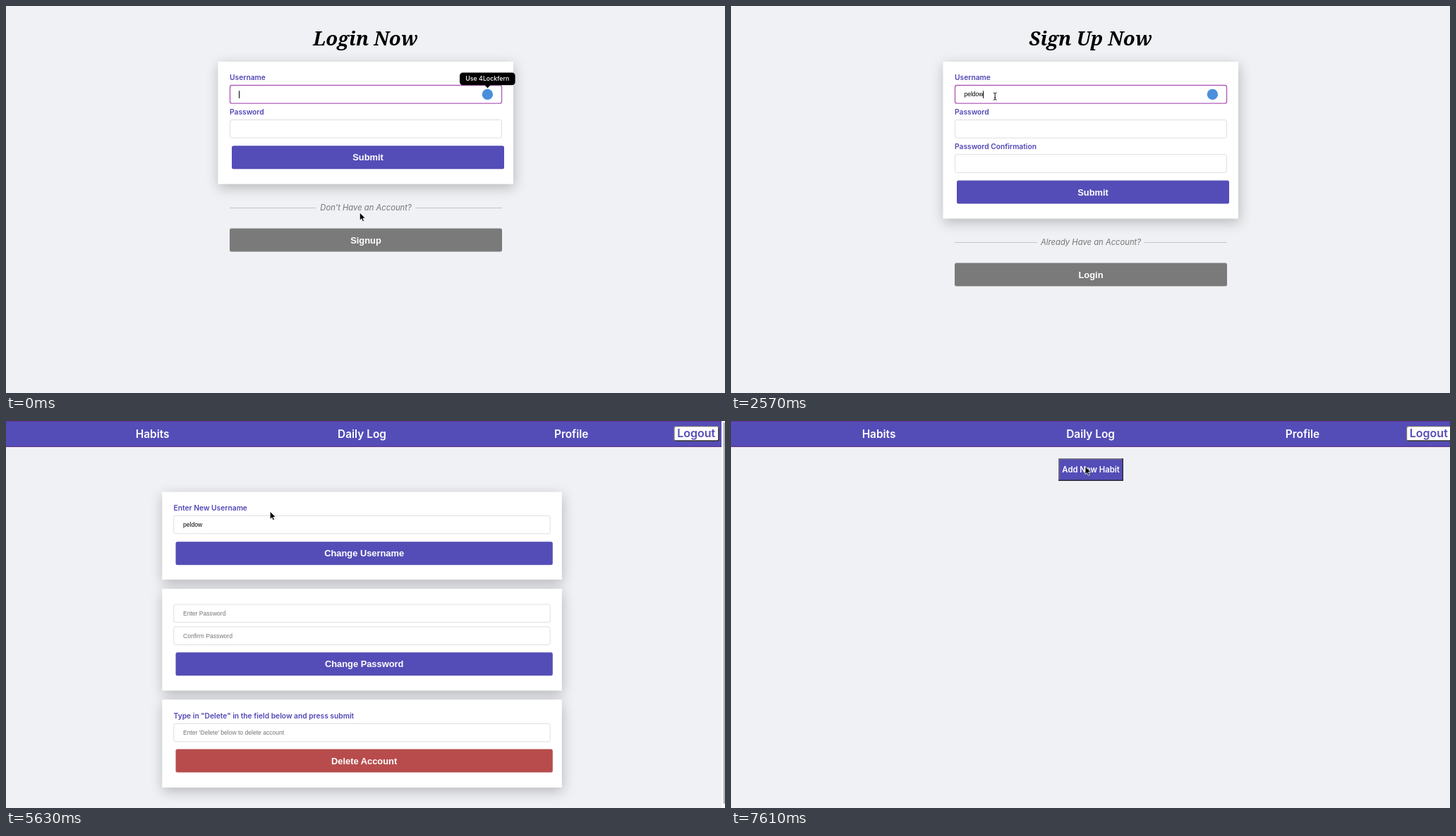
Recreate the animation shown at these times as an HTML page. Size 1019x549 px, loop 8000 ms.

```html
<!DOCTYPE html>
<html lang="en">
<head>
<meta charset="utf-8">
<title>Habit tracker sign up</title>
<style>
  html, body { margin: 0; width: 100%; height: 100%; overflow: hidden; background: #f0f1f4; }
  svg { display: block; width: 1019px; height: 549px; }
  text { white-space: pre; }
  .title { font: italic 700 27.4px "Noto Serif", Georgia, serif; text-anchor: middle; }
  .label { font: 600 10.25px Inter, sans-serif; fill: #4f46b5; }
  .input { font: 8.57px "Liberation Sans", Arial, sans-serif; fill: #000; }
  .hint { font: 8.57px "Liberation Sans", Arial, sans-serif; fill: #757575; }
  .btn { font: 700 12.86px "Liberation Sans", Arial, sans-serif; fill: #fff; text-anchor: middle; }
  .note { font: italic 400 11.25px Inter, sans-serif; fill: #757575; text-anchor: middle; }
  .nav { font: 600 15.4px Inter, sans-serif; fill: #fff; text-anchor: middle; }
  .logout { font: 600 16px Inter, sans-serif; fill: #544db7; }
  .add { font: 600 11.3px Inter, sans-serif; fill: #fff; text-anchor: middle; }
  .tip { font: 500 8.8px Inter, sans-serif; fill: #fff; text-anchor: middle; }
  .card { fill: #fff; filter: drop-shadow(1.5px 5px 9px rgba(0, 0, 0, .24)); }
</style>
</head>
<body>
<svg id="stage" viewBox="0 0 1019 549" xmlns="http://www.w3.org/2000/svg"></svg>
<script>
const LOOP = 8000, STEP = 89.5;
const VIOLET = '#544db7', GREY = '#7a7a7a', RED = '#b84c4c', FOCUS = '#b05fb8';
const NAME = 'peldow';

// Key times in ms
const SIGNUP = 450, PROFILE = 5540, HABITS = 6860;
const FOCUS_AT = [1420, 2930, 3830, 4820];
const TIP_ON = 1510, TIP_OFF = 2050;
const KEYS = [
  [1960, 2140, 2220, 2390, 2480, 2570],
  [3290, 3380, 3560, 3650, 3740],
  [4190, 4460, 4550, 4640, 4730]
];

// Pointer path: time, x, y
const PATH = [
  [0, 501.3, 293], [300, 507, 326], [480, 505, 325], [800, 330, 142],
  [1000, 301, 104], [1500, 374.2, 128.2], [5990, 374.2, 128.2],
  [6620, 225, 26], [6800, 225, 26], [7590, 502, 64.5]
];

const SHAPES = {
  arrow: '<path d="M0 0V11.2L2.6 8.8L4.3 12.7L6.2 11.9L4.6 8.1H8.1Z" fill="#000" stroke="#fff" stroke-width=".8"/>',
  beam: '<path d="M-2.3-5Q0-5 0-3.8Q0-5 2.3-5M0-4V4M-2.3 5Q0 5 0 3.8Q0 5 2.3 5M-1.2 1.8H1.2" fill="none" stroke="#111"/>',
  hand: '<path d="M-1 .8Q0-.8 1 .8V4.4Q2.4 3.6 3 4.8Q4.4 4.2 4.8 5.4Q6.4 5 6.4 6.8V8.6L5.4 12H-.6L-3.4 8Q-4 6.4-2.6 6.4L-1 7.8Z" fill="#fff" stroke="#000" stroke-width=".9"/>' +
    '<path d="M1 8V10.5M2.6 8V10.5M4.2 8V10.5" stroke="#000" stroke-width=".6"/>'
};

const pen = document.createElement('canvas').getContext('2d');
const textWidth = s => {
  pen.font = '8.57px "Liberation Sans", Arial, sans-serif';
  return pen.measureText(s).width;
};

const rect = (x, y, w, h, fill, r = 0, more = '') =>
  `<rect x="${x}" y="${y}" width="${w}" height="${h}" rx="${r}" fill="${fill}" ${more}/>`;
const text = (cls, x, y, s) => `<text class="${cls}" x="${x}" y="${y}">${s}</text>`;
const card = (x, y, w, h) => rect(x, y, w, h, '#fff', 0, 'class="card"');
const button = (x, y, w, s, fill = VIOLET) =>
  rect(x, y, w, 33, fill, 2.5) + text('btn', x + w / 2, y + 21.1, s);
const field = (x, y, w, on = false) =>
  rect(x + .5, y + .5, w - 1, 25.6, '#fff', 2.5, `stroke="${on ? FOCUS : '#dedede'}" stroke-width="${on ? 1.4 : 1}"`);
const caret = (x, y) => rect(x, y + 8.3, 1, 10.6, '#000');
const badge = y => `<circle cx="682.4" cy="${y + 13.4}" r="7.7" fill="#4a8fdc"/>`;
const count = (times, t) => times.filter(at => t >= at).length;

function dots(n, y) {
  let out = '';
  for (let i = 0; i < n; i++) out += `<circle cx="${331.8 + i * 3.05}" cy="${y + 13.2}" r="1.2"/>`;
  return out;
}

const tooltip = () =>
  rect(643, 94.4, 78.6, 17.8, '#000', 4.5) +
  '<path d="M678.5 112H686.5L682.5 116.6Z"/>' +
  text('tip', 682.3, 106.4, 'Use 4Lockfern');

function footer(y, gap, note, label) {
  const line = (a, b) => rect(a, y, b - a, 1, '#c3c4c6');
  return line(317, 509.8 - gap) + line(509.8 + gap, 703) +
    text('note', 510, y + 3.7, note) + button(317, y + 29.6, 386, label, GREY);
}

function loginPage() {
  return text('title', 509.5, 56, 'Login Now') + card(300.5, 79, 418.5, 173.6) +
    text('label', 317, 104.8, 'Username') + text('label', 317, 154, 'Password') +
    field(317, 112, 386, true) + field(317, 161, 386) +
    caret(330, 112) + badge(112) + button(320, 198.2, 386, 'Submit') +
    footer(286, 70.3, "Don't Have an Account?", 'Signup') + tooltip();
}

function signupPage(t) {
  const focus = count(FOCUS_AT, t) - 1;
  const typed = KEYS.map(k => count(k, t));
  const user = NAME.slice(0, typed[0]);
  let out = text('title', 509.5, 56, 'Sign Up Now') + card(300.5, 79, 418.5, 222.6);
  ['Username', 'Password', 'Password Confirmation'].forEach((s, i) => {
    const y = 112 + i * 49.1;
    out += text('label', 317, y - 7.2, s) + field(317, y, 386, focus === i);
    out += i ? dots(typed[i], y) : text('input', 330.4, y + 16.3, user);
    if (focus === i) {
      const w = i ? typed[i] * 3.05 : textWidth(user);
      out += caret(330 + w, y) + badge(y);
    }
  });
  out += button(320, 247.4, 386, 'Submit');
  if (focus === 3) out += rect(319.7, 247.1, 386.7, 33.7, 'none', 2.8, 'stroke="#a64fae"');
  out += footer(335, 76.2, 'Already Have an Account?', 'Login');
  return t >= TIP_ON && t < TIP_OFF ? out + tooltip() : out;
}

function navBar(w, xs) {
  return rect(0, 0, w, 36.6, VIOLET) + rect(0, 0, w, 1, '#6d2ca0') + rect(0, 35.8, w, 1, '#5b2480') +
    ['Habits', 'Daily Log', 'Profile'].map((s, i) => text('nav', xs[i], 24.4, s)).join('');
}

const logout = x =>
  rect(x, 7.6, 63, 20.6, '#fff', 2.5, 'stroke="#77777c" stroke-width="1.2"') +
  `<path d="M${x + 1} 28.2H${x + 61}Q${x + 63} 28.2 ${x + 63} 26V9.5" fill="none" stroke="#222" stroke-width="1.3"/>` +
  text('logout', x + 4.2, 23.4, 'Logout');

function profilePage(t) {
  const scroll = 3.6 * ease((t - 6170) / 270);
  const entry = (y, cls, s) => field(237.3, y, 534.4) + text(cls, 251, y + 16.3, s);
  const act = (y, s, fill) => button(240.5, y, 534.3, s, fill);
  return `<g transform="translate(0 ${-scroll})">` +
    navBar(1014, [207.6, 504.5, 801.2]) +
    card(221.3, 100.6, 566.5, 124.4) +
    text('label', 237.5, 127.1, 'Enter New Username') +
    entry(133.8, 'input', NAME) + act(171.2, 'Change Username') +
    card(221.3, 238, 566.5, 144.4) +
    entry(259.6, 'hint', 'Enter Password') + entry(291.4, 'hint', 'Confirm Password') +
    act(328.2, 'Change Password') +
    card(221.3, 395.2, 566.5, 124.8) +
    text('label', 237.5, 421.6, 'Type in "Delete" in the field below and press submit') +
    entry(428.8, 'hint', "Enter 'Delete' below to delete account") +
    act(465.6, 'Delete Account', RED) + '</g>' +
    rect(1014, 0, 5, 549, '#fafafa') + rect(1016.6, 2 + scroll, 2.4, 541, '#b4b4b8', 1.2) +
    logout(947);
}

function habitsPage() {
  return navBar(1019, [209.5, 509.6, 810]) + logout(957.6) +
    rect(464, 53, 92, 32, VIOLET) +
    '<path d="M464.7 85V53.7H556" fill="none" stroke="#77777c" stroke-width="1.4"/>' +
    '<path d="M464 84.3H555.3V53" fill="none" stroke="#2c2b35" stroke-width="1.4"/>' +
    text('add', 510, 72.5, 'Add New Habit');
}

function ease(p) {
  p = Math.min(1, Math.max(0, p));
  return p * p * (3 - 2 * p);
}

function pointerAt(t) {
  const q = Math.floor((t + 14) / STEP) * STEP;
  let i = 0;
  while (i < PATH.length - 2 && q >= PATH[i + 1][0]) i++;
  const [t0, x0, y0] = PATH[i], [t1, x1, y1] = PATH[i + 1];
  const p = ease((q - t0) / (t1 - t0));
  return [x0 + (x1 - x0) * p, y0 + (y1 - y0) * p];
}

function pointer(t) {
  const [x, y] = pointerAt(t);
  let shape = 'arrow';
  if (t >= SIGNUP && t < 5630 && x > 317 && x < 703 && y > 112 && y < 139) shape = 'beam';
  if (t >= PROFILE && y < 33 && x > 180 && x < 240) shape = 'hand';
  return `<g transform="translate(${x.toFixed(2)} ${y.toFixed(2)})">${SHAPES[shape]}</g>`;
}

function scene(t) {
  const page = t < SIGNUP ? loginPage() : t < PROFILE ? signupPage(t) :
    t < HABITS ? profilePage(t) : habitsPage();
  return rect(0, 0, 1019, 549, '#f0f1f4') + page + pointer(t);
}

const stage = document.getElementById('stage');
const start = performance.now();
let shown = '';

function tick() {
  const next = scene((performance.now() - start) % LOOP);
  if (next !== shown) stage.innerHTML = shown = next;
  requestAnimationFrame(tick);
}
tick();
</script>
</body>
</html>
```
